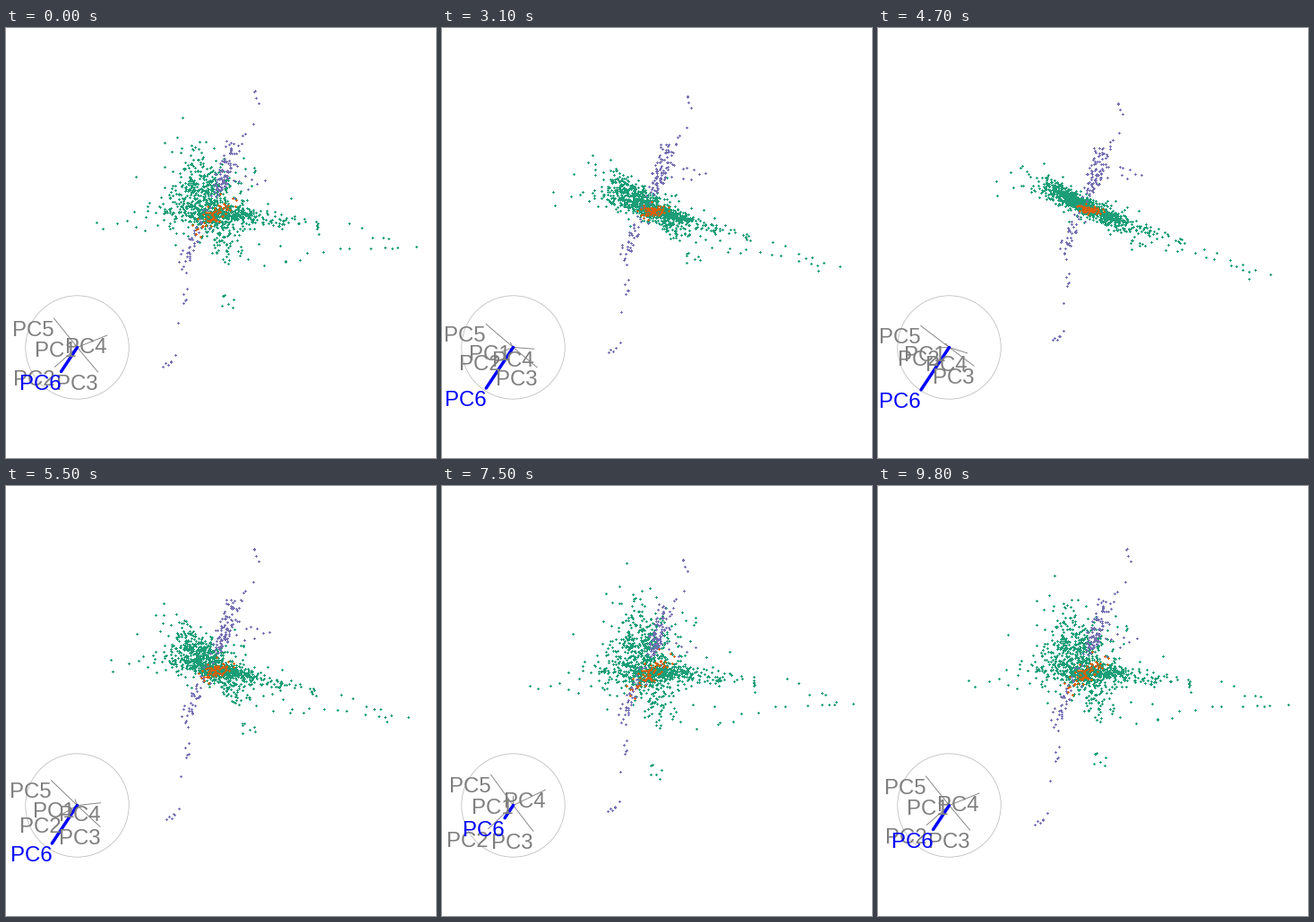
Animation, 480 px wide and 480 px high, one loop 10 s. Source, as a matplotlib script:

```python
import numpy as np
import matplotlib.pyplot as plt
from matplotlib.animation import FuncAnimation
from matplotlib.path import Path

SIZE, DPI = 480, 96
PX = 72 / DPI                        # points per pixel
GREEN, ORANGE, PURPLE = "#1b9e77", "#d95f02", "#7570b3"
GRAY = "#7f7f7f"

# Radial tour: PC6 swings in and out along U, V stays fixed on screen.
U = np.array([-0.553, 0.833])
V = np.array([0.833, 0.553])
CENTRE = np.array([240, 196])
DIAL, RADIUS = np.array([79.5, 356.5]), 57.7
START = np.radians(55.8)

# Axis loadings in dial pixels: along V, along U, out of the plane
AXES = {
    "PC1": (-5.7, -9, 0),
    "PC2": (-8.8, 39, 0),
    "PC3": (34.6, 12.3, 0),
    "PC4": (20.4, -36, 0),
    "PC5": (-39.8, -15.4, 0),
    "PC6": (0, 0, RADIUS),
}


def angle(step):
    """Six even steps lead to the full PC6 axis, four to none of it."""
    if step >= 0:
        return START * (1 - step / 6)
    return START + (np.pi / 2 - START) * -step / 4


def project(pts, phi, origin):
    v, w, x = np.asarray(pts, float).T
    u = x * np.cos(phi) + w * np.sin(phi)
    return origin + np.outer(v, V) + np.outer(u, U)


# ---- data -------------------------------------------------------------
rng = np.random.default_rng(6)


def blob(n, mx, my, sx, sy):
    return rng.normal((mx, my), (sx, sy), (n, 2))


def streak(n, start, end, jitter):
    return np.linspace(start, end, n) + rng.normal(0, jitter, (n, 2))


def lift_green(screen):
    """Green points lie near a tilted sheet; given as seen at step -3."""
    phi = angle(-3)
    rel = screen - CENTRE
    v, s = rel @ V, rel @ U
    off = np.clip(2.4 * rng.standard_t(2.5, len(v)), -18, 18)
    x = 5 - 0.16 * v + off
    w = (s - x * np.cos(phi)) / np.sin(phi)
    return np.column_stack([v, w, x])


def lift_purple(screen):
    """Purple points lie near a line; given as seen at step 0."""
    c, s = np.cos(START), np.sin(START)
    rel = screen - CENTRE
    w = (rel @ U + 8 * c) / (1.02 * c + s)
    return np.column_stack([rel @ V, w, 1.02 * w - 8])


def strand(w, mid, slope, sv, sx):
    n = len(w)
    v = mid + slope * w + rng.normal(0, sv, n)
    return np.column_stack([v, w, 1.02 * w - 8 + rng.normal(0, sx, n)])


def make_green():
    reach = np.minimum(rng.exponential(36, 150), 103)
    arm = np.column_stack(
        [245 + reach, 207 + 0.09 * reach + rng.normal(0, 5, 150)])
    return lift_green(np.vstack([
        blob(370, 225, 197, 19, 20),              # core
        blob(200, 237, 208, 15, 5),
        arm,
        blob(70, 186, 206, 18, 12),
        blob(150, 222, 168, 16, 20),
        blob(60, 239, 240, 9, 18),
        blob(40, 235, 205, 36, 30),
        streak(8, (385, 220), (457, 247), 4),     # sparse fringes
        streak(6, (356, 250), (435, 245), 4),
        streak(7, (268, 266), (328, 258), 9),
        streak(7, (222, 315), (248, 320), 6),
        streak(4, (97, 224), (132, 222), 1),
        streak(9, (189, 120), (232, 124), 8),
        blob(6, 280, 148, 10, 9),
        [(209, 81), (147, 163)],
    ]))


def make_purple():
    ends = np.vstack([
        streak(4, (276, 70), (280, 83), 2),
        streak(4, (273, 108), (260, 126), 2),
        streak(6, (176, 381), (186, 364), 2),
        streak(5, (198, 309), (201, 292), 1),
        streak(4, (194, 268), (198, 256), 3),
        [(192, 329)],
    ])
    return np.vstack([
        strand(rng.normal(-15, 8, 65), -9, 0.4, 4, 6),
        strand(rng.uniform(-44, -22, 26), -9, 0.4, 4.5, 6),
        strand(rng.normal(30, 10, 26), -12, 0.22, 4, 4),
        strand(rng.uniform(42, 66, 9), -15, 0.3, 4, 4),
        lift_purple(ends),
        rng.normal((16, -10, -50), (11, 16, 8), (7, 3)),
    ])


def make_orange(n=70):
    w = rng.normal(17, 14, n)
    v = 1 - 0.25 * (w - 17) + rng.normal(0, 5, n)
    x = 5.5 - 0.2 * v + rng.normal(0, 1.2, n)
    return np.column_stack([v, w, x])


CLOUDS = [(make_green(), GREEN), (make_purple(), PURPLE),
          (make_orange(), ORANGE)]

# ---- timeline, in ticks of 100 ms --------------------------------------
PATH = [*range(7), *range(5, -5, -1), *range(-3, 1)]
TICKS = [19] + [4] * 5 + [8] + [4] * 9 + [6] + [3] * 3 + [2]
STEPS = np.repeat(PATH, TICKS)

# ---- stage --------------------------------------------------------------
fig = plt.figure(figsize=(SIZE / DPI, SIZE / DPI), dpi=DPI, facecolor="white")
ax = fig.add_axes([0, 0, 1, 1])
ax.set(xlim=(0, SIZE), ylim=(SIZE, 0))
ax.axis("off")

# Plus sign of three by three pixels
a, b = 0.5, 1.5
cross = Path([(-a, -b), (a, -b), (a, -a), (b, -a), (b, a), (a, a), (a, b),
              (-a, b), (-a, a), (-b, a), (-b, -a), (-a, -a), (-a, -b)],
             closed=True)
dots = [ax.plot([], [], ls="", marker=cross, ms=3 * PX, mew=0, color=colour)[0]
        for _, colour in CLOUDS]

ax.add_patch(plt.Circle(DIAL, RADIUS, fill=False, ec="#bebebe", lw=0.8 * PX))
spokes, labels = [], []
for name in AXES:
    main = name == "PC6"
    colour = "blue" if main else GRAY
    spokes.append(ax.plot([], [], color=colour, lw=(3.5 if main else 0.9) * PX,
                          solid_capstyle="round", zorder=3)[0])
    labels.append(ax.text(0, 0, name, color=colour, fontsize=24 * PX,
                          family="Liberation Sans", ha="right",
                          va="baseline", zorder=4))


def draw(i):
    phi = angle(STEPS[i])
    for (pts, _), dot in zip(CLOUDS, dots):
        dot.set_data(*project(pts, phi, CENTRE).T)
    tips = project(list(AXES.values()), phi, DIAL)
    for tip, spoke, label in zip(tips, spokes, labels):
        spoke.set_data(*zip(DIAL, tip))
        label.set_position((tip[0], tip[1] + 20))
    return dots + spokes + labels


anim = FuncAnimation(fig, draw, frames=len(STEPS), interval=100,
                     repeat=True, repeat_delay=0)
plt.show()
```
